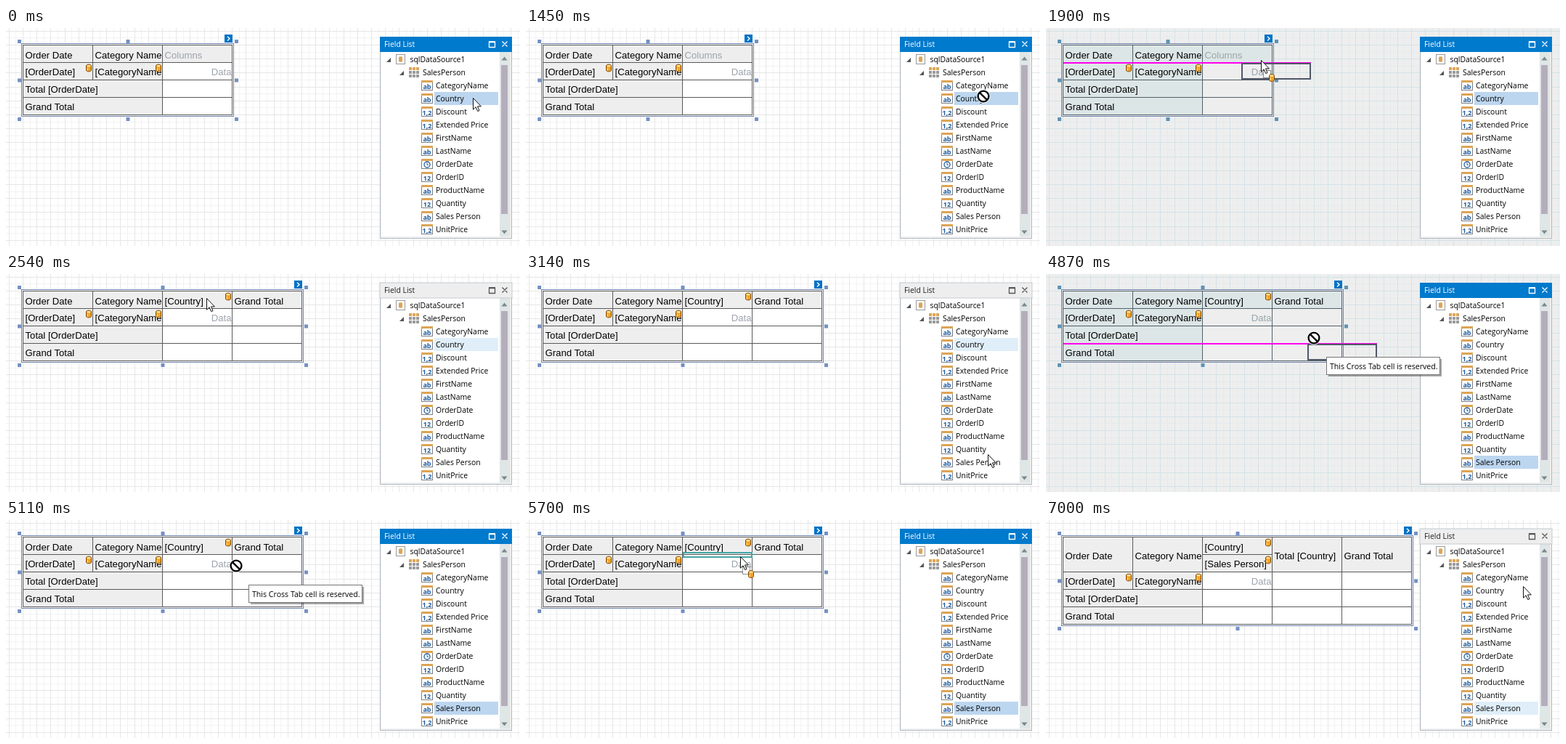
Write an HTML page that moves like this. It is 708 by 300 pixels and loops after 8.03 s.

```html
<!DOCTYPE html>
<html lang="en">
<head>
<meta charset="utf-8">
<title>Cross tab fields</title>
<style>
html, body { margin: 0; width: 100%; height: 100%; overflow: hidden; background: #fff; }
svg { display: block; width: 708px; height: 300px; }
#surface { --bg: #fff; --minor: #f3f3f3; --major: #e6e6e6; --head: #eee; --hint: #9ca2ac; --grip: #7591c4; --rule: #5a5a5a; }
#surface.tint { --bg: #eee; --minor: #e5ebed; --major: #d3e3e8; --head: #dde6e6; --hint: #98a5aa; --grip: #5f93b5; --rule: #52606a; }
.table text { font: 13.15px "Liberation Sans", Arial, sans-serif; fill: #000; }
.table text.hint { fill: var(--hint); }
.ui { font: 10.4px "Open Sans", "Noto Sans", sans-serif; fill: #000; }
.glyph { font: bold 9px "Open Sans", "Noto Sans", sans-serif; fill: #1f5a9c; text-anchor: middle; }
</style>
</head>
<body>
<svg viewBox="0 0 708 300">
  <defs>
    <g id="db">
      <path d="M-3.5 -3V3.2C-3.5 5.4 3.5 5.4 3.5 3.2V-3C3.5 -5.4 -3.5 -5.4 -3.5 -3Z" fill="#f0a326" stroke="#7d4a0c"/>
      <ellipse cy="-2.7" rx="2.7" ry="1.3" fill="#ffe3a0"/>
      <path d="M-1.6 .2V3.6" stroke="#ffd883" stroke-width="1.4"/>
    </g>
    <path id="arrow" d="M.5 .5V16.2L4.1 12.8L6.7 18.6L9 17.6L6.5 11.9H11.4Z" fill="#fff" stroke="#111"/>
  </defs>
  <g id="surface">
    <rect width="708" height="300" fill="var(--bg)"/>
    <path id="minor" stroke="var(--minor)"/>
    <path id="major" stroke="var(--major)"/>
    <g id="tables"></g>
    <path id="snap" stroke="#f0e" stroke-width="2"/>
    <rect id="ghost" width="94" height="21" fill="none" stroke="#505868" stroke-width="2"/>
    <rect id="target" x="217" width="94" fill="none" stroke="#45a5a5" stroke-width="2"/>
  </g>
  <g id="panel"></g>
  <g id="tip">
    <rect x="3" y="4" width="156" height="24" fill="#000" opacity=".35"/>
    <rect x=".5" y="1.5" width="156" height="24" fill="#fff" stroke="#767676"/>
    <text class="ui" x="5" y="17.5" style="font-size:10.6px">This Cross Tab cell is reserved.</text>
  </g>
  <g id="cursor">
    <use id="point" href="#arrow"/>
    <g id="carry">
      <rect x="3.5" y="14.5" width="10" height="10" fill="#fff" stroke="#222" stroke-dasharray="1 1"/>
      <use href="#arrow"/>
      <use href="#db" x="15" y="24.5"/>
    </g>
    <g id="deny" fill="none">
      <circle r="7.4" fill="#fff" stroke="#fff" stroke-width="4"/>
      <circle r="7.4" stroke="#000" stroke-width="2.4"/>
      <path d="M-5.2 -5.2L5.2 5.2" stroke="#000" stroke-width="2.4"/>
    </g>
  </g>
</svg>
<script>
const LOOP = 8030, COL = 96, ROW = 24, LEFT = 23.5, TOP = 23.5, EDGE = 515, STEP = 9.6;
const $ = id => document.getElementById(id);
const show = (el, on) => el.setAttribute('display', on ? 'inline' : 'none');
const set = (el, attrs) => { for (const k in attrs) el.setAttribute(k, attrs[k]); };

// Grid lines run on whole pixels, in step with the table corner
function gridPath(step) {
  let d = '';
  for (let k = -2; k * step < 708; k++) {
    const p = Math.round(LEFT + .5 + k * step) - .5;
    d += `M${p} 0V300M0 ${p}H708`;
  }
  return d;
}
set($('minor'), { d: gridPath(STEP) });
set($('major'), { d: gridPath(STEP * 2) });

// Cells are [column, row, column span, row span, text, kind]
function cellMarkup([c, r, w, h, text, kind]) {
  const x = LEFT + c * COL, y = TOP + r * ROW, right = x + w * COL;
  const fill = kind === 'data' ? 'var(--bg)' : 'var(--head)';
  const base = y + h * ROW / 2 + (r ? 5.5 : 6.5);
  const hint = kind === 'data' || kind === 'hint' ? 'class="hint"' : '';
  const place = kind === 'data' ? `x="${right - 1}" text-anchor="end"` : `x="${x + 3}"`;
  return `<rect x="${x}" y="${y}" width="${w * COL}" height="${h * ROW}" fill="${fill}" stroke="var(--rule)"/>` +
    `<text ${place} y="${base}" ${hint}>${text}</text>` +
    (kind === 'db' ? `<use href="#db" x="${right - 5.5}" y="${y + 7.5}"/>` : '');
}

function tableMarkup(cols, top, heads) {
  const cells = [
    [0, 0, 1, top, 'Order Date'], [1, 0, 1, top, 'Category Name'], ...heads,
    [0, top, 1, 1, '[OrderDate]', 'db'], [1, top, 1, 1, '[CategoryName', 'db'],
    [0, top + 1, 2, 1, 'Total [OrderDate]'], [0, top + 2, 2, 1, 'Grand Total']
  ];
  for (let c = 2; c < cols; c++)
    for (let r = 0; r < 3; r++)
      cells.push([c, top + r, 1, 1, c === 2 && r === 0 ? 'Data' : '', 'data']);
  const w = cols * COL, h = (top + 3) * ROW, tag = LEFT + w - 10.5;
  const mx = LEFT + w / 2 + .5, my = TOP + h / 2 + .5;
  let grips = '';
  for (const x of [18.5, mx, LEFT + w + 6])
    for (const y of [18.5, my, TOP + h + 6])
      if (x !== mx || y !== my)
        grips += `<rect x="${x - 2.5}" y="${y - 2.5}" width="5" height="5" fill="var(--grip)"/>`;
  return `<g class="table"><rect x="21.5" y="21.5" width="${w + 4}" height="${h + 4}" fill="var(--bg)" stroke="#6b80aa"/>` +
    cells.map(cellMarkup).join('') + grips +
    `<rect x="${tag}" y="9" width="11" height="11" fill="#0072c6"/>` +
    `<path d="M${tag + 4} 11.8l3 2.8l-3 2.8" fill="none" stroke="#fff" stroke-width="1.4"/></g>`;
}

$('tables').innerHTML =
  tableMarkup(3, 1, [[2, 0, 1, 1, 'Columns', 'hint']]) +
  tableMarkup(4, 1, [[2, 0, 1, 1, '[Country]', 'db'], [3, 0, 1, 1, 'Grand Total']]) +
  tableMarkup(5, 2, [[2, 0, 1, 1, '[Country]', 'db'], [2, 1, 1, 1, '[Sales Person]', 'db'],
    [3, 0, 1, 2, 'Total [Country]'], [4, 0, 1, 2, 'Grand Total']]);

const fields = [
  ['CategoryName', 'ab'], ['Country', 'ab'], ['Discount', '1,2'], ['Extended Price', '1,2'],
  ['FirstName', 'ab'], ['LastName', 'ab'], ['OrderDate', ''], ['OrderID', '12'],
  ['ProductName', 'ab'], ['Quantity', '12'], ['Sales Person', 'ab'], ['UnitPrice', '1,2']
];
const rowY = i => 79 + 18 * i;

function fieldMarkup([name, glyph], i) {
  const y = rowY(i);
  const mark = glyph
    ? `<text class="glyph" x="580" y="${y + 5}">${glyph}</text>`
    : `<circle cx="580" cy="${y + 1}" r="4" fill="none" stroke="#1f5a9c" stroke-width="1.3"/>` +
      `<path d="M580 ${y - 1.5}V${y + 1.3}H582" fill="none" stroke="#1f5a9c"/>`;
  return `<rect x="572.5" y="${y - 6.5}" width="15" height="13" fill="#fff" stroke="#7a7f86"/>` +
    `<rect x="572" y="${y - 7}" width="16" height="3" fill="#dda454"/>${mark}` +
    `<text class="ui" x="592" y="${y + 4}">${name}</text>`;
}

const expander = (x, y) => `<path d="M${x + 3} ${y - 3}V${y + 3}H${x - 3}Z" fill="#555"/>`;

$('panel').innerHTML = `
  <rect x="515.5" y="12.5" width="181" height="277" fill="#eee" stroke="#b4bbc4"/>
  <rect x="517" y="33" width="163" height="254" fill="#fff"/>
  <rect x="680" y="33" width="14" height="254" fill="#dfe6e6"/>
  <rect id="bar" x="515" y="12" width="182" height="21"/>
  <g id="caption">
    <text class="ui" x="521" y="26" style="fill:inherit">Field List</text>
    <path d="M665.5 19.5H673.5V26.5H665.5ZM665 18.7H674M683.5 18.5L690.5 25.5M690.5 18.5L683.5 25.5" fill="none" stroke-width="1.3"/>
  </g>
  <rect id="pick" x="590" width="88" height="18"/>
  ${expander(527, 44)}${expander(545, 62)}
  <rect x="537.5" y="36.5" width="12" height="13" fill="#fff" stroke="#9a9a9a"/>
  <path d="M541 40.5V45.5C541 47.2 546 47.2 546 45.5V40.5C546 38.8 541 38.8 541 40.5Z" fill="#dda454"/>
  <text class="ui" x="556.5" y="47">sqlDataSource1</text>
  <g fill="none" stroke-width="4" stroke-dasharray="4 1">
    <path d="M555 56H569" stroke="#dda454"/>
    <path d="M555 61H569M555 66H569" stroke="#9a9a9a"/>
  </g>
  <text class="ui" x="574" y="65">SalesPerson</text>
  ${fields.map(fieldMarkup).join('')}
  <rect x="682" y="51" width="9" height="205" fill="#b5adbc"/>
  <path d="M682.5 44.5L686.5 39.5L690.5 44.5ZM682.5 278.5L686.5 283.5L690.5 278.5Z" fill="#7b8890"/>`;

const smooth = u => u * u * (3 - 2 * u);
const cubic = u => u < .5 ? 4 * u ** 3 : 1 - 4 * (1 - u) ** 3;

// Pointer path: [time, x, y, easing into the point, vertical bow]
const path = [
  [0, 643, 96], [1300, 643, 96], [2020, 290, 43, cubic], [2140, 276, 33, smooth],
  [2510, 276, 33], [3330, 655, 257, cubic, 13], [3600, 664, 259, smooth],
  [3980, 664, 259], [3980, 656, 255], [4110, 656, 255], [4110, 648, 251],
  [4270, 648, 251], [4270, 650, 254], [5070, 317, 63, smooth, -8.5],
  [5100, 317, 63], [5700, 295, 50, smooth], [6130, 295, 50],
  [6970, 657, 91, cubic], [LOOP, 657, 91]
];

function pointer(t) {
  const i = path.findIndex(k => k[0] > t);
  const [t0, x0, y0] = path[i - 1], [t1, x1, y1, ease = smooth, bow = 0] = path[i];
  const s = ease((t - t0) / (t1 - t0));
  return [x0 + (x1 - x0) * s, y0 + (y1 - y0) * s + bow * 4 * s * (1 - s)].map(Math.round);
}

const tables = [...$('tables').children];

function draw(t) {
  const [x, y] = pointer(t);
  const first = t >= 1330 && t < 2540, second = t >= 4270 && t < 6160;
  const drag = first || second, outside = drag && x < EDGE;
  const tint = outside && t < (first ? 1960 : 5020);
  const reserved = second && x > 312 && x < 408;
  const stage = t < 2540 ? 0 : t < 6160 ? 1 : 2;

  tables.forEach((el, i) => show(el, i === stage));
  $('surface').setAttribute('class', tint ? 'tint' : '');

  // Ghost of the new control, snapped vertically
  const gx = x - (first ? 27 : 9), gy = Math.ceil(y / 12) * 12;
  show($('ghost'), tint);
  show($('snap'), tint);
  set($('ghost'), { x: gx + 1, y: gy + 1 });
  set($('snap'), { d: `M24 ${gy}H${gx + 96}` });

  show($('target'), outside && !tint && !reserved);
  set($('target'), first ? { y: 25, height: 22 } : y < 57 ? { y: 45, height: 6 } : { y: 49, height: 22 });

  const active = t < 2540 || (t >= 3820 && t < 6160);
  set($('bar'), { fill: active ? '#007acc' : '#eee', stroke: active ? 'none' : '#c4c9d0' });
  set($('caption'), { fill: active ? '#fff' : '#222' });
  set($('caption').lastElementChild, { stroke: active ? '#fff' : '#555' });
  set($('pick'), { y: rowY(t < 3820 ? 1 : 10) - 9, fill: active ? '#bcd6f0' : '#dfeef9' });

  const deny = drag && (!outside || reserved);
  show($('point'), !drag);
  show($('carry'), drag && !deny);
  show($('deny'), deny);
  set($('cursor'), { transform: `translate(${x} ${y})` });
  show($('tip'), reserved);
  set($('tip'), { transform: `translate(${x + 17} ${y + 25})` });
}

const start = performance.now();
function tick() {
  draw((performance.now() - start) % LOOP);
  requestAnimationFrame(tick);
}
tick();
</script>
</body>
</html>
```
